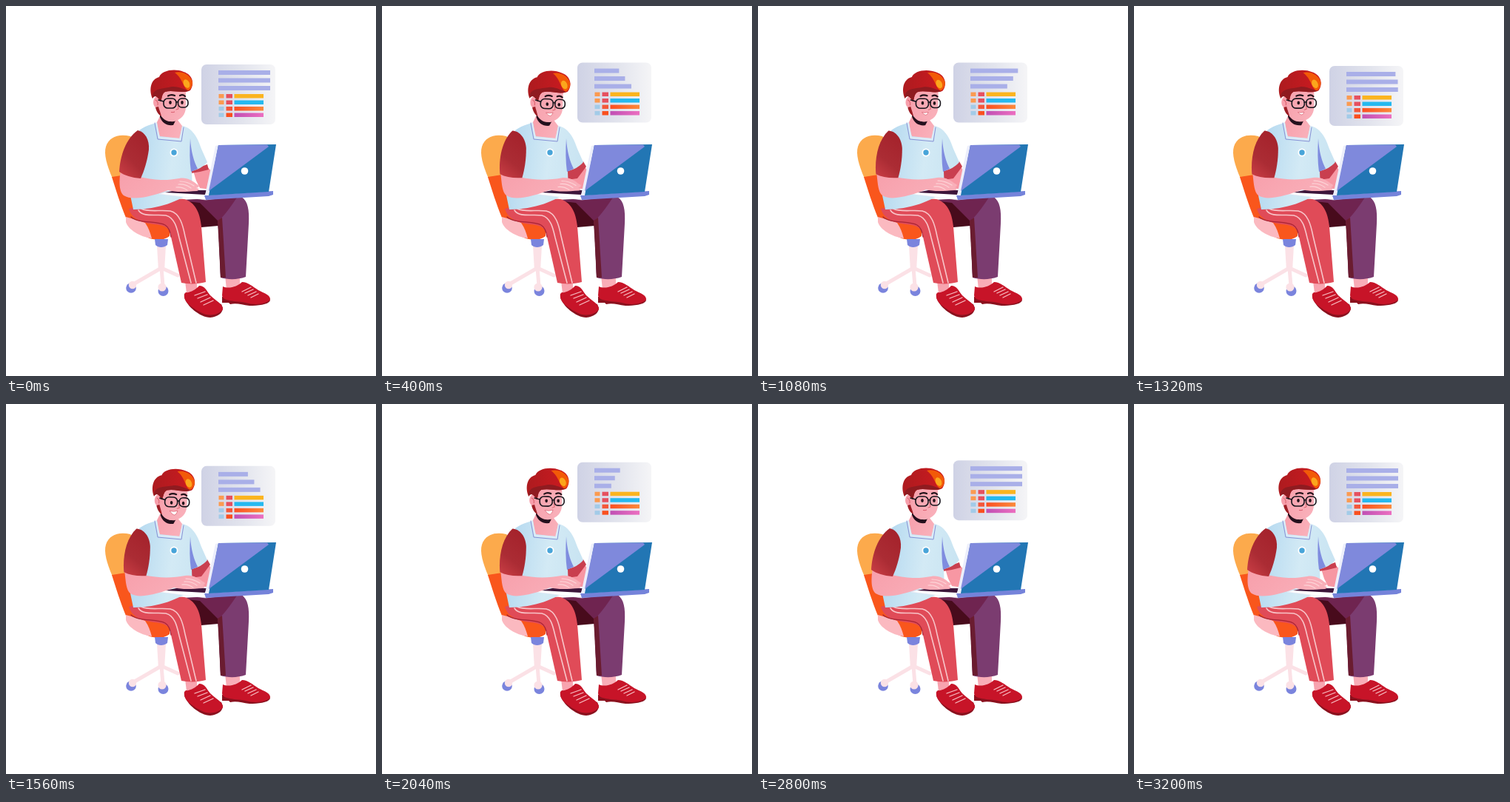
An HTML page that plays this animation: 500x500 px, repeating every 3.24 s.

```html
<!DOCTYPE html>
<html lang="en">
<head>
<meta charset="utf-8">
<title>Working at a laptop</title>
<style>
html, body { margin: 0; width: 100%; height: 100%; overflow: hidden; background: #fff; }
svg { display: block; width: 100vw; height: 100vh; }
.line { fill: none; stroke-linecap: round; stroke-linejoin: round; }
</style>
</head>
<body>
<svg viewBox="0 0 500 500">
  <defs>
    <linearGradient id="card"><stop stop-color="#cfd2e5"/><stop offset=".55" stop-color="#e2e4ed"/><stop offset="1" stop-color="#f5f5f7"/></linearGradient>
    <linearGradient id="shirt" x2="1" y2=".15"><stop stop-color="#b0d6ef"/><stop offset=".6" stop-color="#d3eaf5"/><stop offset="1" stop-color="#c9e4f2"/></linearGradient>
    <linearGradient id="sleeve" x1=".8" y1=".1" x2=".2" y2="1"><stop stop-color="#a5232c"/><stop offset=".6" stop-color="#ab2c34"/><stop offset="1" stop-color="#c63c43"/></linearGradient>
    <linearGradient id="skin" x2="1" y2=".4"><stop stop-color="#f79fab"/><stop offset="1" stop-color="#f9afb9"/></linearGradient>
    <linearGradient id="hair"><stop stop-color="#ad1b1f"/><stop offset="1" stop-color="#cd1a20"/></linearGradient>
    <linearGradient id="orange"><stop stop-color="#fb4f22"/><stop offset="1" stop-color="#fb8a3c"/></linearGradient>
    <linearGradient id="magenta"><stop stop-color="#c04fb4"/><stop offset="1" stop-color="#ec6fc0"/></linearGradient>
  </defs>

  <g id="chair">
    <path fill="#fcaa4c" d="M144 233C136 215 132 200 135 190C139 177 152 172 168 176L186 192L166 229Z"/>
    <path fill="#f9561c" d="M143 231L162 228L174 270L200 290L222 294L221 311C212 318 202 316 194 314C180 308 168 296 162 286C154 266 149 250 143 231Z"/>
    <path fill="#fbb9c0" d="M162 285C172 288 181 290 188 293C193 300 195 307 197 314C181 312 165 302 162 292Z"/>
    <path class="line" stroke="#fbe1e6" stroke-width="5" d="M210 354L172 376M210 354L212 378M210 354L232 364"/>
    <path fill="#fbe1e6" d="M204 324H216L214 358H206Z"/>
    <path fill="#7a84dd" d="M201 315H219L218 323C213 327 206 327 202 323Z"/>
    <g fill="#7a84dd"><circle cx="169" cy="381" r="6.8"/><circle cx="212.5" cy="385" r="7"/></g>
    <g fill="#fbe1e6"><circle cx="171" cy="377" r="5.2"/><circle cx="211" cy="380" r="5.6"/></g>
  </g>

  <g id="legs">
    <path fill="url(#skin)" d="M296 364H316V381L298 383ZM242 372H258V384L244 388Z"/>
    <path fill="#7b3c70" d="M240 262L318 258C327 263 329 276 328 294L324 366C313 370 300 370 290 367L287 296L262 297Z"/>
    <path fill="#6f2450" d="M240 262L312 259C303 272 295 284 286 291L293 367L290 367L287 296L262 297Z"/>
    <path fill="#480b1c" d="M245 264L262 266L286 290L287 297L264 299Z"/>
    <path fill="#6a1c30" d="M286 290L292 286L297 367L290 367Z"/>
    <path fill="#e04b58" d="M166 274C190 267 225 259 241 261C255 265 262 278 264 298L270 373C260 376 246 376 237 374L223 312C222 300 215 296 200 295C184 293 170 288 166 274Z"/>
    <path class="line" stroke="#a82436" stroke-width="1.3" d="M169 285C178 294 204 290 215 296C220 299 222 305 223 312"/>
    <g class="line" stroke="#f8c4c8" stroke-width="1.6">
      <path d="M179 276C185 286 203 281 216 283C228 286 231 300 234 313L250 374"/>
      <path d="M183 274C192 279 210 275 222 277C235 280 239 296 242 311L257 374"/>
    </g>
  </g>

  <g id="shoes">
    <path fill="#8b111e" d="M241 394C244 405 262 421 276 421C286 420 293 415 293 408L291 403Z"/>
    <path fill="#c71428" d="M243 387C248 388 257 383 261 378C269 378 271 385 276 391C284 399 293 402 293 410C287 418 273 420 263 414C252 408 239 400 241 389Z"/>
    <path fill="#8b111e" d="M292 393V401H301L303 403C312 401 319 404 329 405C340 405 354 404 357 398L352 390Z"/>
    <path fill="#c71428" d="M293 379C301 383 313 379 319 373C327 373 333 379 341 384C349 388 358 391 357 397C349 404 335 404 324 401C311 398 293 400 292 391Z"/>
    <path class="line" stroke="#f8bfc4" stroke-width="1.3" d="M255 391L269 386M259 395L272 390M263 400L276 394M267 404L280 398M319 386L331 380M323 388L334 383M327 391L338 386M331 394L341 389"/>
  </g>

  <path id="farHand" fill="#f797a3"/>
  <path id="farSleeve" fill="#c93f4f"/>

  <g id="torso">
    <path fill="url(#shirt)" d="M180 168C190 161 202 157 213 157L239 162C254 166 260 181 264 193L272 211C266 218 259 221 251 223L252 250C236 263 206 275 172 275L168 256L184 228Z"/>
    <path fill="#7f8cdf" d="M249 179C250 197 254 210 259 220L250 224C248 210 248 195 249 179Z"/>
    <path fill="url(#skin)" d="M204 157C205 165 206 172 208 176L235 179L238 162L232 154L208 149Z"/>
    <path class="line" stroke="#dcecf8" stroke-width="2" d="M203 158L207 178L235 180L239 163"/>
    <path class="line" stroke="#8792d6" stroke-width="1" d="M201 158L205 180L237 183L240 164"/>
    <circle cx="227" cy="198" r="5.5" fill="#fff"/><circle cx="227" cy="198" r="3.7" fill="#48a4d9"/>
  </g>

  <g id="head">
    <path fill="#24101d" d="M208 144C211 155 221 158 229 155L226 161C217 162 211 158 208 150Z"/>
    <path fill="url(#skin)" d="M204 118L207 145C212 153 220 157 227 156C237 153 243 147 243 136L243 110L217 107Z"/>
    <ellipse cx="204" cy="130" rx="5" ry="7.5" fill="#f79fab"/>
    <path fill="#9c1d24" d="M202 137L206 136C207 140 209 145 210 149C206 147 203 142 202 137Z"/>
    <path class="line" stroke="#d9606b" d="M202 127Q206 129 205 134"/>
    <path fill="url(#hair)" d="M198 125C193 114 195 99 207 96C210 87 228 84 240 89C253 93 255 106 249 114C240 119 226 113 215 116C210 119 211 125 209 129L206 125C203 121 200 121 198 125Z"/>
    <path fill="#8f1b20" d="M198 120C201 111 211 112 224 109C234 108 242 114 248 114C238 119 226 113 215 116C210 119 211 125 209 129L206 125C203 121 200 121 198 125Z"/>
    <path fill="#f25a08" d="M228 90C239 87 250 94 252 103C252 109 249 113 246 114C239 110 239 98 228 90Z"/>
    <ellipse cx="244" cy="105" rx="4" ry="6" transform="rotate(-25 244 105)" fill="#fba61c"/>
    <path class="line" stroke="#22121a" stroke-width="2.2" d="M219 121.5Q223 119 228 121M235 121Q239 119 242 122"/>
    <g id="pupils" fill="#22121a"><ellipse cx="222" cy="130.5" rx="1.8" ry="2.4"/><ellipse cx="238" cy="130.5" rx="1.8" ry="2.4"/></g>
    <g class="line" stroke="#17151c" stroke-width="1.6">
      <rect x="213" y="125" width="17" height="13" rx="5.5"/><rect x="232.5" y="125" width="13.5" height="12" rx="5"/>
      <path d="M206 127L213 129M230 130Q231 129 232.5 130"/>
    </g>
    <path class="line" stroke="#d8626c" d="M232 134L233 139L230 140"/>
    <path id="mouth" fill="#fff" stroke="#d9596a" stroke-width=".7"/>
  </g>

  <g id="laptop">
    <path fill="#fff" stroke="#e2e4f4" stroke-width=".6" d="M207 254L230 248H273L360 251L270 262Z"/>
    <path fill="#3c153a" d="M215 252L230 249H271L269 255Z"/>
    <path fill="#7583da" d="M268 256L361 250V255L355 257L270 262Z"/>
    <path fill="#eceefb" d="M283 189L288 188L275 256H269Z"/>
    <path fill="#2276b4" d="M287 188L365 187L355 251L274 256Z"/>
    <path fill="#7f89dc" d="M287 188L353 187.5L355 190L274 250Z"/>
    <circle cx="322.5" cy="223" r="4.8" fill="#fff"/>
  </g>

  <path id="arm" fill="url(#skin)"/>
  <path id="fingers" class="line" stroke="#fdd5d8" stroke-width="1.2"/>
  <path id="nearSleeve" fill="url(#sleeve)" d="M178 168C188 170 194 181 193 194C191 209 187 222 182 233C170 232 160 229 153 224C154 203 162 179 178 168Z"/>

  <g id="panel">
    <rect x="264" width="100" height="81" rx="7" fill="url(#card)"/>
    <g id="bars" fill="#a9afe8"></g>
    <g id="rows"></g>
  </g>
</svg>
<script>
const LOOP = 3240;
const $ = id => document.getElementById(id);
const ease = p => (1 - Math.cos(Math.PI * p)) / 2;

function addRect(parent, x, y, width, height, fill) {
  const rect = document.createElementNS("http://www.w3.org/2000/svg", "rect");
  const attrs = { x, y, width, height };
  if (fill) attrs.fill = fill;
  for (const name in attrs) rect.setAttribute(name, attrs[name]);
  return parent.appendChild(rect);
}

const bars = [8, 18.5, 29].map(y => addRect($("bars"), 287, y, 70, 6));
const rowColors = [
  ["#fb9a50", "#e6505f", "#fbb41f"],
  ["#fb9a50", "#e6505f", "#25b9ef"],
  ["#a2cbe8", "#f4573a", "url(#orange)"],
  ["#a2cbe8", "#f9501f", "url(#magenta)"]
];
rowColors.forEach((colors, i) => {
  const y = 40 + i * 8.5;
  addRect($("rows"), 287.5, y, 7, 5.5, colors[0]);
  addRect($("rows"), 297.5, y, 8.5, 5.5, colors[1]);
  addRect($("rows"), 308.5, y, 39.5, 5.5, colors[2]);
});

// Eased value between [time, value] keys
function track(t, keys) {
  if (t <= keys[0][0]) return keys[0][1];
  for (let i = 1; i < keys.length; i++) {
    const [t0, a] = keys[i - 1], [t1, b] = keys[i];
    if (t < t1) return a + (b - a) * ease((t - t0) / (t1 - t0));
  }
  return keys[keys.length - 1][1];
}

const floatKeys = [[0, 79], [810, 74], [1620, 84], [2430, 74], [3240, 79]];
const barKeys = [[0, 70], [607.5, 20.5], [1215, 70], [1822.5, 20.5], [2430, 70]];
const tiltKeys = [[0, 0], [607.5, 1], [810, 1], [1215, 0], [1620, 1], [2025, 0.1], [2430, 0]];
const smileKeys = [[0, 0], [607.5, 1], [810, 1], [1215, 0.5], [1620, 1], [2025, 1], [2430, 0]];
const reachKeys = [[0, 0], [405, 1], [2100, 1], [2500, 0]];

function drawArms(reach, lift) {
  const x = reach * 8, y = -lift * 10, e = reach * 9;
  const at = (px, py) => `${px + x} ${py + y}`;
  $("arm").setAttribute("d",
    `M${155 + e / 2} 222C${153 + e} 234 ${152 + e} 250 ${159 + e} 256` +
    `C${171 + e} 264 ${198 + x} ${257 + y / 2} ${at(219, 249)}` +
    `C${at(230, 252)} ${at(243, 251)} ${at(258, 250)}` +
    `C${at(262, 249)} ${at(261, 246)} ${at(257, 246)}` +
    `C${at(262, 245)} ${at(262, 242)} ${at(258, 241)}` +
    `C${at(252, 236)} ${at(244, 231)} ${at(234, 233)}` +
    `C${at(217, 236)} ${203 + x / 2} ${236 + y / 2} ${181 + x / 2} 231Z`);
  $("fingers").setAttribute("d",
    `M${at(235, 237)}Q${at(245, 237)} ${at(254, 243)}` +
    `M${at(233, 241)}Q${at(242, 240)} ${at(250, 246)}` +
    `M${at(230, 245)}Q${at(238, 244)} ${at(245, 249)}`);
  $("nearSleeve").setAttribute("transform", `rotate(${-8 * reach} 180 180)`);

  const top = 216 - reach * 4;
  $("farHand").setAttribute("d", `M253 223L270 ${top}L279 224L277 248L262 ${246 - lift * 4}L257 236Z`);
  $("farSleeve").setAttribute("d",
    `M250 ${226 + reach * 9}L250 222L272 ${top - 2}L${274 + reach * 2} ${top + 5}L${262 + reach * 2} ${224 + reach * 9}Z`);
}

function render(t) {
  $("panel").setAttribute("transform", `translate(0 ${track(t, floatKeys)})`);
  bars.forEach((bar, i) => bar.setAttribute("width", track(t - i * 67, barKeys)));

  const tilt = track(t, tiltKeys), smile = track(t, smileKeys);
  $("head").setAttribute("transform", `translate(0 ${tilt * 0.6}) rotate(${tilt * 3} 216 165)`);
  $("pupils").setAttribute("transform", `translate(0 ${tilt * 2})`);
  const w = 2.5 + smile * 3;
  $("mouth").setAttribute("d",
    `M${225.5 - w} 143.5Q225.5 ${144 + smile} ${225.5 + w} 143Q${227 + smile} ${144 + smile * 11} ${225.5 - w} 143.5Z`);

  const reach = track(t, reachKeys);
  const lift = reach * (1 + Math.cos((t - 744) / 240 * 2 * Math.PI)) / 2;
  drawArms(reach, lift);
}

const start = performance.now();
function tick() {
  render((performance.now() - start) % LOOP);
  requestAnimationFrame(tick);
}
tick();
</script>
</body>
</html>
```
